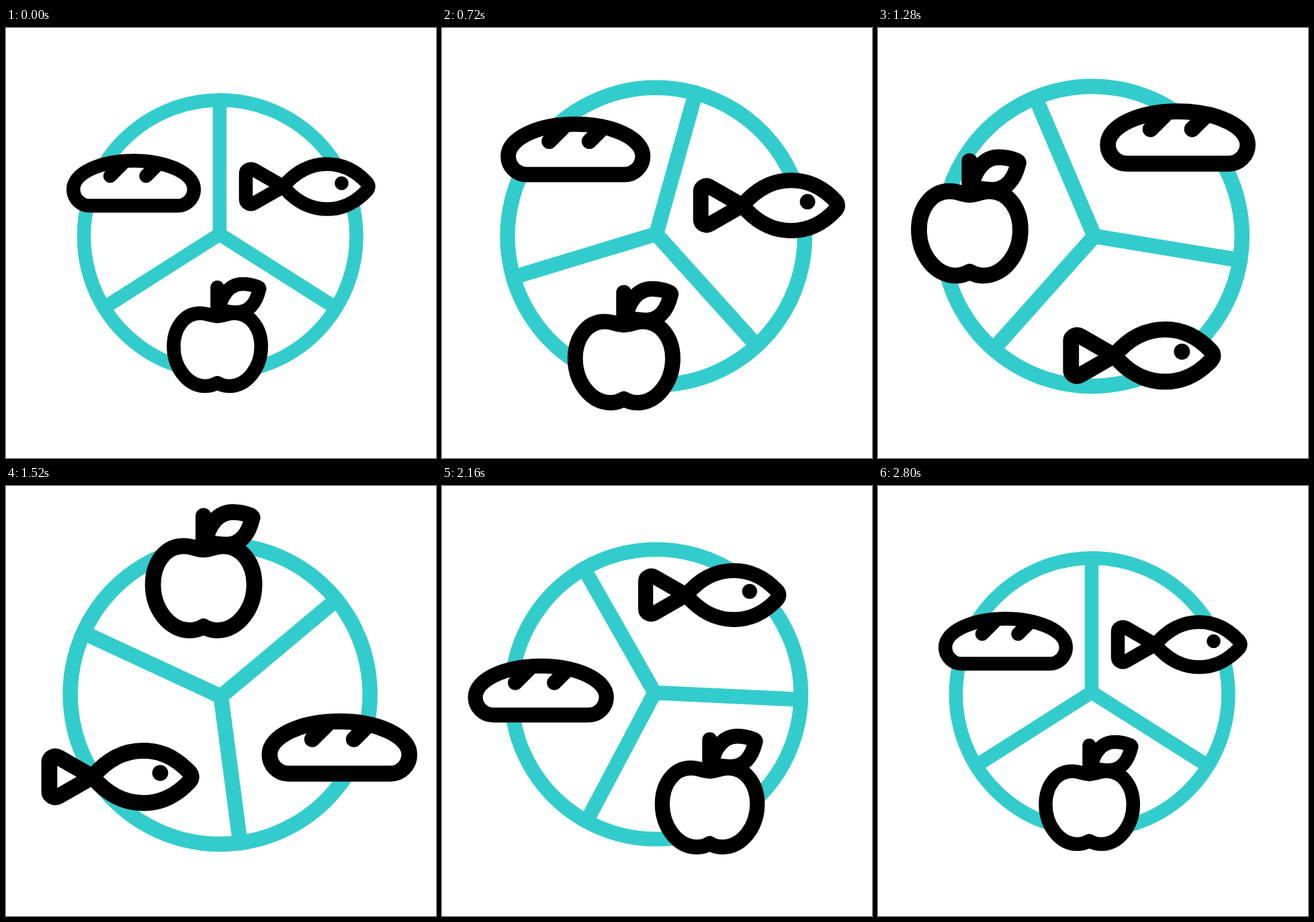
An HTML page for the animation above (3000 ms loop, 640 by 640 pixels).

```html
<!DOCTYPE html>
<html lang="en">
<head>
<meta charset="utf-8">
<title>Balanced diet</title>
<style>
  html, body { margin: 0; height: 100%; overflow: hidden; background: #fff; }
  svg { display: block; width: 100%; height: 100%; }
  g { fill: #fff; stroke: #000; stroke-width: 20.5; stroke-linecap: round; stroke-linejoin: round; }
  #wheel { fill: none; stroke: #3cc; }
</style>
</head>
<body>
<svg viewBox="0 0 640 640">
  <g id="wheel">
    <circle cx="318.7" cy="310" r="202.8"/>
    <path d="M318 107V307L146.5 416M318 307L490 416"/>
  </g>
  <g id="bread">
    <path d="M124.8 264.6H255.2A24.6 24.6 0 0 0 279.8 240C279.8 216.4 239.6 197.4 190 197.4S100.2 216.4 100.2 240A24.6 24.6 0 0 0 124.8 264.6Z"/>
    <path d="M155 220.3L173 202.3M208.5 220.3L226.5 202.3"/>
  </g>
  <g id="fish">
    <path d="M412.6 236L369 211C364 208 357 211 357 217V255C357 261 364 264 369 261Z"/>
    <path d="M412.6 236C430 215 452 202.4 478 202.4C503 202.4 522 214 537 230Q542 236 537 242C522 258 503 269.6 478 269.6C452 269.6 430 257 412.6 236Z"/>
    <circle cx="499.5" cy="231" r="10.3" style="fill:#000;stroke:none"/>
  </g>
  <g id="apple">
    <path d="M317 420C320 398 333 381 352 381C362 381 369 383 375 385.5Q378 387 377 389C372 411 360 423 344 423C334 423 325 421 317 420Z"/>
    <path d="M314.5 429C305 429 300 424.6 289 424.6C265 424.6 249.5 447 249.5 474C249.5 505 270 533 297 533C304 533 309.5 531 314.5 528C319.5 531 325 533 332 533C359 533 379.8 505 379.8 474C379.8 447 364 424.6 340 424.6C329 424.6 324 429 314.5 429Z"/>
    <path d="M314.5 386V429"/>
  </g>
</svg>
<script>
const LOOP = 3000, CX = 318.7, CY = 310;
const wheel = document.getElementById('wheel');

// x, y: resting centre; dx, dy: outward push at full spread
const icons = [
  { id: 'bread', x: 190, y: 231, dx: -22, dy: -13.5 },
  { id: 'fish', x: 448.5, y: 236, dx: 18.4, dy: -19.2 },
  { id: 'apple', x: 314.5, y: 457, dx: 4.8, dy: 21 }
].map(icon => ({ ...icon, el: document.getElementById(icon.id) }));

const smooth = s => s * s * (3 - 2 * s);
const ramp = (t, from, to) => smooth(Math.min(1, Math.max(0, (t - from) / (to - from))));
const pulse = (t, a, b, c, d) => ramp(t, a, b) - ramp(t, c, d);

// One full turn along a cubic Bézier whose handles lie at 1781 and 1340 ms
function turn(t) {
  let lo = 0, hi = 1;
  for (let i = 0; i < 24; i++) {
    const s = (lo + hi) / 2, r = 1 - s;
    const time = 220 * r ** 3 + 3 * 1781 * s * r * r + 3 * 1340 * s * s * r + 2760 * s ** 3;
    if (time < t) lo = s; else hi = s;
  }
  return 360 * smooth((lo + hi) / 2);
}

function draw(now) {
  const t = now % LOOP;
  const angle = turn(t);
  const zoom = 1 + 0.1 * pulse(t, 200, 840, 1841, 2619);
  const spread = pulse(t, 290, 1260, 1670, 2540);
  const cos = Math.cos(angle * Math.PI / 180), sin = Math.sin(angle * Math.PI / 180);

  wheel.setAttribute('transform',
    `translate(${CX} ${CY}) rotate(${angle}) scale(${zoom}) translate(${-CX} ${-CY})`);

  for (const { el, x, y, dx, dy } of icons) {
    const px = zoom * (x - CX + dx * spread), py = zoom * (y - CY + dy * spread);
    el.setAttribute('transform',
      `translate(${CX + px * cos - py * sin} ${CY + px * sin + py * cos}) ` +
      `scale(${zoom * (1 + 0.053 * spread)}) translate(${-x} ${-y})`);
  }
  requestAnimationFrame(frame);
}

function frame() { draw(performance.now()); }
draw(0);
</script>
</body>
</html>
```
